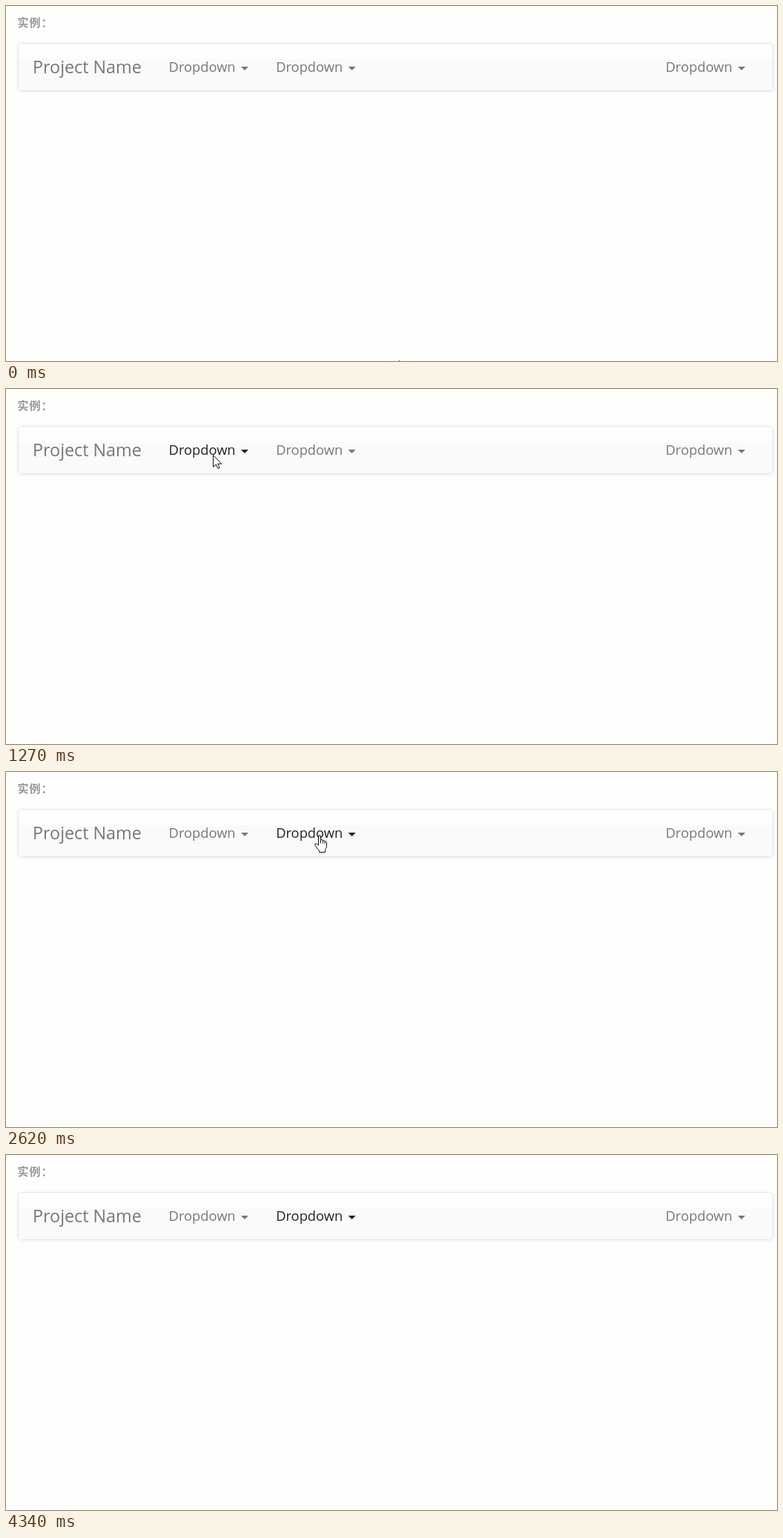
These frames come from a looping animation (1040x480 px, 5.1 s). An HTML page:

```html
<!DOCTYPE html>
<html lang="zh-CN">
<head>
<meta charset="utf-8">
<title>Navbar dropdowns</title>
<style>
  html, body { margin: 0; width: 100%; height: 100%; overflow: hidden; background: #fefefd; }
  svg { display: block; width: 1040px; height: 480px; }
  text { font-family: "Open Sans", "Noto Sans", sans-serif; font-size: 18.3px; }
  .label { font: bold 15px "Noto Sans CJK SC", "Noto Sans CJK", sans-serif; letter-spacing: 1px; fill: #959595; }
  .brand { font-size: 23.3px; }
  .bar { filter: drop-shadow(0 1px 2.5px rgba(0, 0, 0, .075)); }
</style>
</head>
<body>
<svg id="stage" viewBox="0 0 1040 480">
  <defs>
    <linearGradient id="openFill" x1="0" y1="0" x2="0" y2="1">
      <stop offset="0" stop-color="#dbdbdb"/><stop offset="1" stop-color="#e2e2e2"/>
    </linearGradient>
  </defs>
  <rect width="1040" height="480" fill="#fefefd"/>
  <text class="label" x="15.5" y="28">实例：</text>
  <rect class="bar" x="16.5" y="50.5" width="1018" height="64" rx="5" fill="#fefefe" stroke="#e5e5e6"/>
  <path d="M17 72H1034V110Q1034 114 1030 114H21Q17 114 17 110Z" fill="#fafafd"/>
  <g id="nav"></g>
  <g id="menus"></g>
  <g id="pointer" fill="#fff" stroke="#111" stroke-linejoin="round">
    <path id="arrow" d="M.5 .5V16.5L4.3 13L6.8 18.6L9.2 17.6L6.7 12.2H11.8Z"/>
    <g id="hand" transform="translate(-6 0)">
      <path d="M5.5 14V2Q5.5 .5 7 .5T8.5 2V7.5Q9 6.3 10.2 6.5T11.5 8Q12 7.2 13 7.5T14.2 9.2Q14.8 8.4 15.6 8.9T16.5 10.5V15.5Q16.5 17 15.5 18.5T14.5 21V23.5H6.5V21.5L1.2 14.5Q.2 12.8 1.2 12T3.5 12.3Z"/>
      <path d="M8.5 7V11.5M11.5 8V11.5M14.2 9.2V12" fill="none"/>
    </g>
  </g>
</svg>
<script>
const LOOP = 5100;
const byId = id => document.getElementById(id);

function add(parent, tag, attrs, text) {
  const el = document.createElementNS("http://www.w3.org/2000/svg", tag);
  for (const key in attrs) el.setAttribute(key, attrs[key]);
  if (text) el.textContent = text;
  parent.appendChild(el);
  return el;
}

function show(el, on) {
  el.setAttribute("visibility", on ? "visible" : "hidden");
}

function makeLink(x) {
  const g = add(byId("nav"), "g", { transform: `translate(${x} 0)` });
  const back = add(g, "rect", { y: 51, width: 145, height: 63, fill: "url(#openFill)" });
  const ink = add(g, "g", {});
  add(ink, "text", { x: 19.6, y: 89 }, "Dropdown");
  add(ink, "path", { d: "M117 82H127L122 87Z" });
  return { back, ink };
}

function makeMenu(x) {
  const g = add(byId("menus"), "g", { transform: `translate(${x} 0)` });
  add(g, "path", {
    d: "M.5 114.5H225.5V284.5Q225.5 289.5 220.5 289.5H5.5Q.5 289.5 .5 284.5Z",
    fill: "#fefefe", stroke: "#d0d0d0"
  });
  add(g, "path", { d: "M1 236.5H225", stroke: "#e5e5e5" });
  const names = ["Action", "Another action", "Something else here", "Separated link"];
  const items = names.map((name, i) =>
    add(g, "text", { x: 26, y: 144.5 + i * 34.5 + (i === 3 ? 23.5 : 0) }, name));
  return { g, items };
}

const brand = add(byId("nav"), "text", { class: "brand", x: 36, y: 91 }, "Project Name");
const links = [200, 344.6, 870.2].map(makeLink);
const menus = [200, 345].map(makeMenu);

// Pointer moves: start time, sampling step, then points as [time, x, y].
const moves = [
  { start: 30, step: 35, path: [[-5, 530, 479], [60, 460, 438], [170, 333, 349]] },
  { start: 440, step: 35, path: [[405, 333, 349], [560, 250, 220], [685, 175, 112],
    [760, 168, 93], [855, 236, 87], [960, 262, 88]] },
  { start: 1000, step: 30, path: [[970, 262, 88], [1030, 279, 89]] },
  { start: 1510, step: 46, path: [[1464, 279, 89], [1510, 284, 160], [1556, 292, 205],
    [1602, 300, 245], [1648, 303, 89]] },
  { start: 2030, step: 35, path: [[1995, 303, 89], [2160, 350, 92], [2410, 422, 85]] },
  { start: 2750, step: 30, path: [[2720, 422, 85], [2750, 423, 85]] },
  { start: 3890, step: 40, path: [[3850, 423, 85], [4010, 590, 200], [4180, 800, 350],
    [4300, 962, 470], [4330, 975, 482]] }
];

function along(path, t) {
  const last = path[path.length - 1];
  if (t >= last[0]) return last.slice(1);
  const i = path.findIndex(p => p[0] > t);
  const [t0, x0, y0] = path[i - 1], [t1, x1, y1] = path[i];
  const k = (t - t0) / (t1 - t0);
  return [x0 + (x1 - x0) * k, y0 + (y1 - y0) * k];
}

function pointerAt(t) {
  let spot = [530, 479];
  for (const { start, step, path } of moves) {
    if (t < start) break;
    spot = along(path, start + Math.floor((t - start) / step) * step);
  }
  return spot.map(Math.round);
}

const within = (t, a, b) => t >= a && t < b;

function draw(t) {
  const [x, y] = pointerAt(t);
  const inBar = y > 50 && y < 114;
  const open = [within(t, 1370, 2000), within(t, 2720, 3480)];
  const dark = [within(t, 890, 2620), t >= 2200];

  brand.setAttribute("fill", within(t, 690, 890) ? "#5e5e5e" : "#777");
  links.forEach(({ back, ink }, i) => {
    show(back, open[i]);
    ink.setAttribute("fill", open[i] ? "#555" : dark[i] ? "#222" : "#777");
  });

  const row = y < 121 ? -1 : Math.floor((y - 121) / 34.5);
  menus.forEach(({ g, items }, i) => {
    show(g, open[i]);
    items.forEach((item, n) => item.setAttribute("fill", n === row && n < 3 ? "#222" : "#333"));
  });

  const pressed = within(t, 1270, 1370);
  const overMenu = open[0] && y > 121 && y < 225;
  const useHand = !pressed && (overMenu || (inBar && x < 490 && t > 600));
  show(byId("hand"), useHand);
  show(byId("arrow"), !useHand);
  byId("pointer").setAttribute("transform", `translate(${x} ${y})`);
}

const began = performance.now();
function tick() {
  draw((performance.now() - began) % LOOP);
  requestAnimationFrame(tick);
}
draw(0);
requestAnimationFrame(tick);
</script>
</body>
</html>
```
